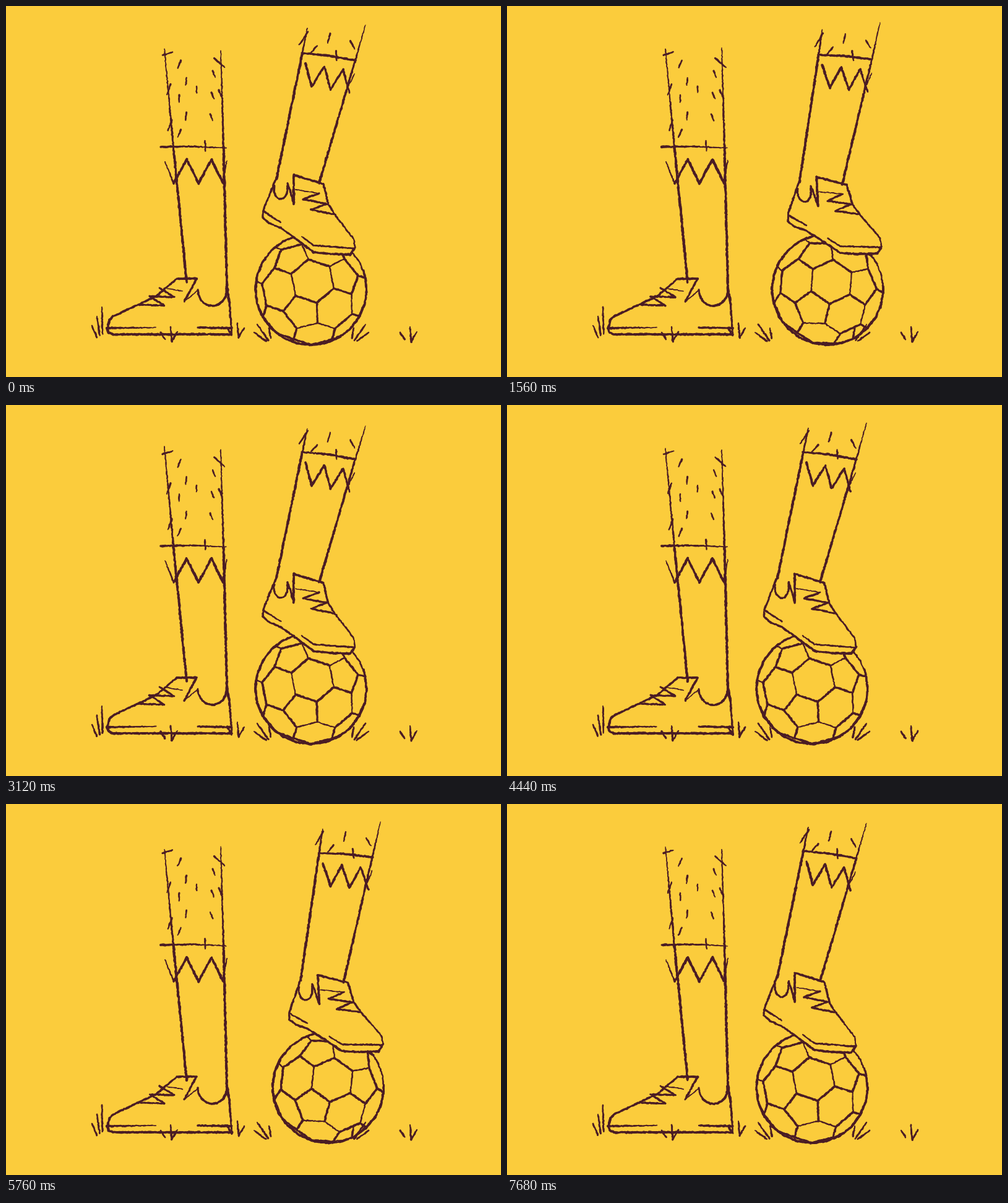
These frames come from a looping animation (800 by 600 pixels, 7800 ms). An HTML page with a canvas:

```html
<!DOCTYPE html>
<html>
<head>
<meta charset="utf-8">
<style>
  html, body { margin: 0; height: 100%; overflow: hidden; background: #fbcc3c; }
  canvas { display: block; }
</style>
</head>
<body>
<canvas id="stage" width="800" height="600"></canvas>
<script>
const ctx = document.getElementById('stage').getContext('2d');
const PAPER = '#fbcc3c', INK = '#4b1d25';
const LOOP = 7800, STEP = 120, CYCLE = 32.5;
const THICK = 3.7, MID = 3, THIN = 1.7;
const RADIUS = 90;
let seed = 1;

function rnd() {
  seed = (seed * 16807) % 2147483647;
  return seed / 2147483647;
}

// Crayon line through x,y pairs; width runs from w0 to w1.
function line(w0, w1, ...p) {
  const parts = p.length / 2 - 1;
  let x = p[0], y = p[1];
  for (let i = 0; i < parts; i++) {
    const [ax, ay, bx, by] = p.slice(2 * i, 2 * i + 4);
    const n = Math.max(1, Math.round(Math.hypot(bx - ax, by - ay) / 2.5));
    for (let k = 1; k <= n; k++) {
      const f = k / n;
      const nx = ax + (bx - ax) * f + rnd() - .5, ny = ay + (by - ay) * f + rnd() - .5;
      ctx.lineWidth = (w0 + (w1 - w0) * (i + f) / parts) * (.75 + rnd() * .5);
      ctx.beginPath();
      ctx.moveTo(x, y);
      ctx.lineTo(nx, ny);
      ctx.stroke();
      x = nx;
      y = ny;
    }
  }
}

// Points of an elliptic arc, angles in degrees.
function arc(cx, cy, rx, ry, from, to) {
  const n = 12;
  return Array.from({ length: n + 1 }, (_, i) => {
    const a = (from + (to - from) * i / n) * Math.PI / 180;
    return [cx + rx * Math.cos(a), cy + ry * Math.sin(a)];
  }).flat();
}

// Points stepping by dx,dy; every second one is pushed out by ox,oy.
function zigzag(n, x, y, dx, dy, ox, oy) {
  return Array.from({ length: n }, (_, i) =>
    [x + i * dx + i % 2 * ox, y + i * dy + i % 2 * oy]).flat();
}

// Short mark centred on x,y.
function hair(x, y, dx, dy) {
  line(MID, 2.2, x - dx / 2, y - dy / 2, x + dx / 2, y + dy / 2);
}

function at(x, y, flip, paint) {
  ctx.save();
  ctx.translate(x, y);
  ctx.scale(flip, 1);
  paint();
  ctx.restore();
}

function sprout() {
  line(MID, MID, -18, -15, -11, -4);
  line(2.4, MID, -2, -24, 0, 0);
  line(2.4, MID, 9, -16, 0, -1);
}

function fan() {
  line(2.4, MID, -27, -13, -8, 1);
  line(2.4, MID, -22, -26, -4, 0);
  line(2.4, MID, -3, -20, 0, -4);
}

function grass() {
  for (let i = 0; i < 3; i++) line(2.4, MID, 139 + 8 * i, 517 - 15 * i, 147 + 4.5 * i, 536 - 3 * i);
  for (const [x, y] of [[268, 543], [376, 537], [655, 543]]) at(x, y, 1, sprout);
  at(428, 541, 1, fan);
  at(559, 541, -1, fan);
}

function standingLeg() {
  line(THIN, MID, 256, 67 + rnd() * 7, 270.5, 228);
  line(THICK, THICK, 270.5, 228, 292, 447);
  line(THIN, MID, 347, 67 + rnd() * 7, 351.5, 228);
  line(THICK, THICK, 351.5, 228, 357, 457);

  for (let i = 0; i < 5; i++) hair(280 + i % 2 * 11, 94 + 28 * i, -1.3 * (i - 2) ** 2, 12);
  for (let i = 0; i < 3; i++) {
    hair(336 - 2 * i, 110 + 35 * i, 4, 10);
    hair(261 + 2 * i, 77 + 58 * i, i ? -6 : 16, i ? 17 : -5);
  }
  hair(308, 135, 0, 10);
  hair(345, 92, 17, 15);
  hair(347, 143, 6, 14);
  hair(322, 226, 1, 16);

  line(THICK, THIN, 250, 228, 300, 227, 356, 229.5);
  line(THIN, 2.4, 257, 252, 271, 287);
  line(THICK, THICK, ...zigzag(5, 271, 287, 20, 0, 1, -39));
  line(MID, THIN, 350, 286, 357, 250);

  // shoe
  line(THICK, MID, 276, 441, 308, 441, 288, 478);
  line(THIN, THIN, 288, 478, 310, 460);
  line(MID, THICK, ...arc(333.5, 459, 23.5, 26, 180, -5));
  line(THICK + 1, 2.4, 357, 457, 361, 480, 365, 531);
  line(THICK, MID, 164, 521, 167, 508, 173, 502, 243, 469, 276, 441);
  line(THICK, THICK, 163, 521, 166, 528, 173, 531, 365, 531);
  line(THICK, THIN, 163, 521, 242, 520);
  line(MID, THICK, 310, 520, 365, 521);
  line(MID, MID, ...zigzag(5, 248, 456, -8, 6.8, 32, 8));
  line(THIN, THIN, 260, 457, 285, 461);
}

// Seams of a truncated icosahedron, one hexagon turned almost to the viewer.
function makeSeams() {
  const ico = [];
  for (let turn = -11; turn < 349; turn += 120) {
    for (const [r, z, off] of [[.607, .795, 0], [.982, .188, 60]]) {
      const a = (turn + off) * Math.PI / 180;
      const v = [r * Math.cos(a), r * Math.sin(a), z];
      ico.push(v, v.map(c => -c));
    }
  }
  const near = (a, b) => a !== b && a[0] * b[0] + a[1] * b[1] + a[2] * b[2] > .4;
  const corner = (a, b) => {
    const [x, y, z] = a.map((c, i) => (2 * c + b[i]) / 2.6055);
    return [x + .03 * z, .986 * y - .166 * z, .166 * y + .986 * z];
  };
  const seams = [];
  ico.forEach((a, i) => ico.forEach((b, j) => {
    if (!near(a, b)) return;
    if (i < j) seams.push([corner(a, b), corner(b, a)]);
    ico.forEach((c, k) => {
      if (j < k && near(a, c) && near(b, c)) seams.push([corner(a, b), corner(a, c)]);
    });
  }));
  return seams.filter(([p, q]) => p[2] > 0 || q[2] > 0);
}

const seams = makeSeams();

// End point of a seam, cut where it passes behind the rim.
function rimCut(p, q) {
  const f = p[2] < 0 ? p[2] / (p[2] - q[2]) : 0;
  const x = p[0] + (q[0] - p[0]) * f, y = p[1] + (q[1] - p[1]) * f;
  const scale = RADIUS * (f ? 1 / Math.hypot(x, y) : 1);
  return [x * scale, y * scale];
}

function ball(roll) {
  ctx.save();
  ctx.translate(493 + roll, 458.5);
  ctx.rotate(roll / 92);
  line(MID, THICK, ...arc(0, 0, RADIUS, RADIUS, 0, 180));
  line(THICK, 2.2, ...arc(0, 0, RADIUS, RADIUS, 180, 360));
  seams.forEach(([p, q], i) => {
    const w = i % 4 ? 3.3 : 2.2;
    line(w, w, ...rimCut(p, q), ...rimCut(q, p));
  });
  ctx.restore();
}

function swingingLeg(angle) {
  ctx.save();
  ctx.translate(547, -379);
  ctx.rotate(-angle);
  ctx.translate(-547, 379);

  const heel = [437, 278, 416, 330, 415, 342];
  const sole = [415, 342, 425, 351, 444, 359, 465, 374, 497, 398, 525, 401, 556, 402, 564, 391];
  const front = [564, 391, 562, 377, 532, 338, 521, 321, 513, 288, 465, 273];

  // the shoe covers the ball
  const shape = [...heel, ...sole, ...front];
  ctx.fillStyle = PAPER;
  ctx.beginPath();
  for (let i = 0; i < shape.length; i += 2) ctx.lineTo(shape[i], shape[i + 1]);
  ctx.fill();

  line(MID, MID, ...heel);
  line(MID, THICK, ...sole);
  line(2.2, THICK, ...front, 465, 320);
  line(MID, MID, ...arc(444, 296, 11, 16, 200, 0), 455, 287, 459, 298, 465, 320);
  line(MID, 2.4, 416, 332, 444, 350);
  line(2.2, MID, 478, 373, 497, 387, 562, 392);
  line(MID, MID, ...zigzag(5, 506, 303, 6.2, 8.5, -32, 1));
  line(THIN, THIN, 468, 297, 506, 303);

  line(THIN, MID, 487, 35 + rnd() * 5, 479, 76);
  line(THICK, THICK, 479, 76, 437, 280);
  line(1.4, 2.6, 581, 28 + rnd() * 6, 564.5, 88);
  line(MID, THICK, 564.5, 88, 506, 287);
  hair(481, 52, -14, 21);
  hair(498, 70, -10, 11);
  hair(522, 52, -4, 15);
  hair(534, 80, 1, 15);
  hair(560, 63, 7, 13);
  line(MID, THICK, 478, 76, 520, 80, 565, 88);
  line(THICK, MID, ...zigzag(6, 484, 93, 15.2, 2.4, -5, 35));
  line(THIN, THIN, 550, 137, 563, 110);
  ctx.restore();
}

function draw(step) {
  seed = 7919 * (step + 3);
  ctx.fillStyle = PAPER;
  ctx.fillRect(0, 0, 800, 600);
  ctx.strokeStyle = INK;
  ctx.lineCap = 'round';
  const u = Math.min(1, Math.max(0, (step % CYCLE - 5) / 20));
  const push = (1 - Math.cos(2 * Math.PI * u)) / 2;
  grass();
  standingLeg();
  ball(27.8 * push);
  swingingLeg(.0595 * push);
}

let start, last = -1;
function tick(now) {
  start ??= now;
  const step = Math.max(1, Math.floor((now - start) % LOOP / STEP));
  if (step !== last) draw(last = step);
  requestAnimationFrame(tick);
}
draw(1);
requestAnimationFrame(tick);
</script>
</body>
</html>
```
